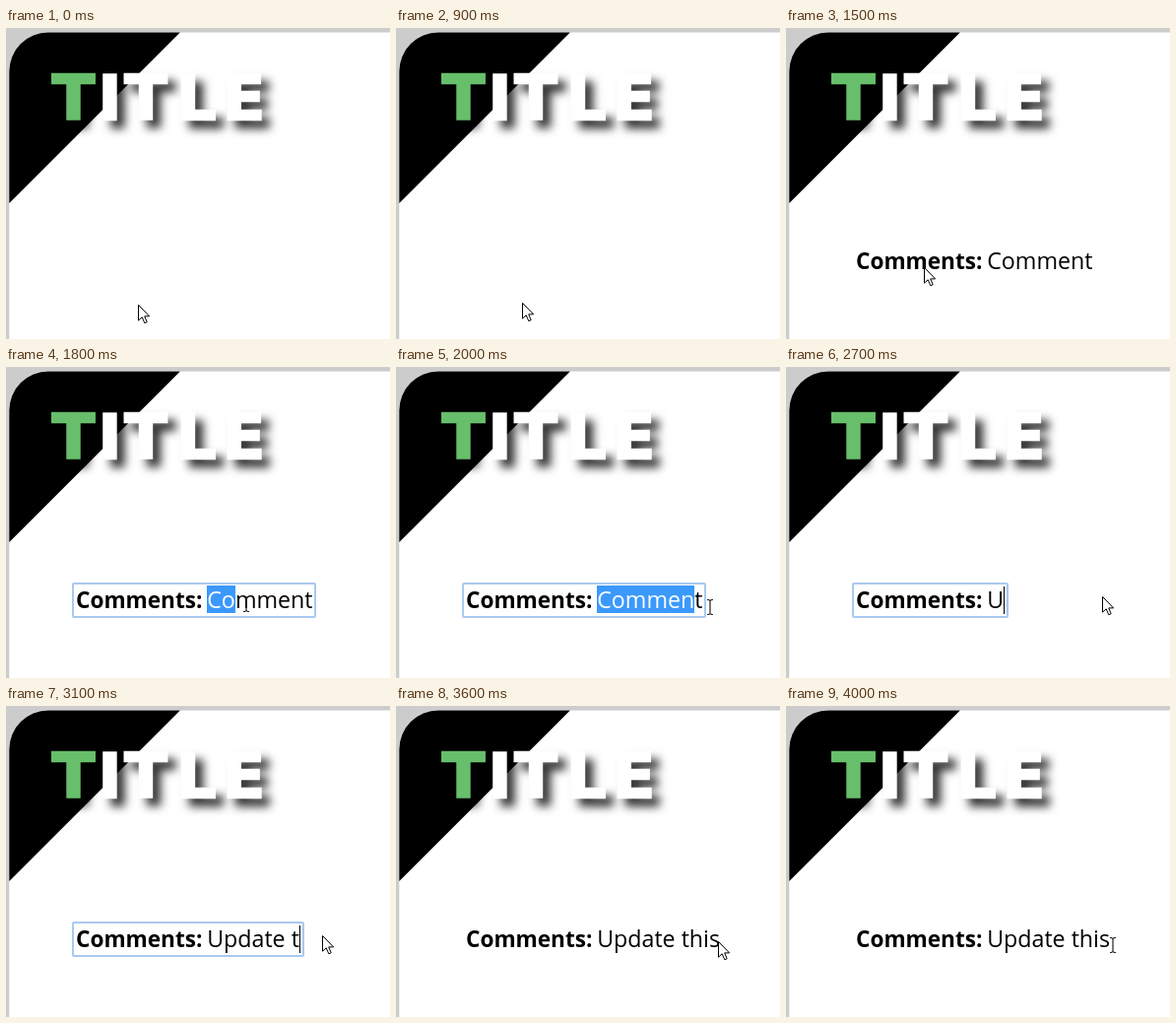
Animation of 390x316 px, one loop 4600 ms. Source, as an HTML page:

```html
<!DOCTYPE html>
<html lang="en">
<head>
<meta charset="utf-8">
<title>Inline edit</title>
<style>
  html, body { margin: 0; width: 100%; height: 100%; overflow: hidden; background: #ccc; }
  #stage { position: relative; width: 390px; height: 316px; overflow: hidden; }
  svg { position: absolute; left: 0; top: 0; }
  #title {
    font: bold 63px "DejaVu Sans", sans-serif;
    fill: #fff; stroke: #fff; stroke-width: 2.6px;
    filter: drop-shadow(8px 8px 5px rgba(0, 0, 0, .8));
  }
  #title tspan { fill: #67bf6b; stroke: #67bf6b; }
  #field {
    position: absolute; left: 67px; top: 219px; height: 32px;
    padding: 0 2px; border: 2px solid transparent; border-radius: 2px;
    font: 23.2px/31px "Open Sans", "Noto Sans", sans-serif;
    color: #000; white-space: pre;
  }
  #field.focus { border-color: #a9c9ef; }
  #field b { font-size: 22.6px; margin-right: 4.8px; }
  #field span { display: inline-block; line-height: 28px; }
  #picked { background: #3c99fc; color: #fff; }
  #caret { width: 1px; height: 28px; background: #000; vertical-align: top; margin-top: 2px; }
</style>
</head>
<body>
<div id="stage">
  <svg width="390" height="316">
    <path d="M3.3 316V44A39.5 39.5 0 0 1 42.8 4.5H390V316Z" fill="#fff"/>
    <path d="M3.3 178V44A39.5 39.5 0 0 1 42.8 4.5H176.8Z"/>
    <text id="title" y="93" x="47 93.8 120.5 173.3 220"><tspan>T</tspan>ITLE</text>
  </svg>
  <div id="field"><b>Comments:</b><span id="picked"></span><span id="rest"></span><span id="caret"></span></div>
  <svg width="390" height="316">
    <g id="pointer">
      <path id="arrow" d="M.5 .5V16.2L4.2 12.8L6.8 18.8L9.2 17.7L6.7 11.9H11.6Z" fill="#fff" stroke="#000"/>
      <path id="beam" d="M-2 -7.5H-.5L1 -6.5L2.5 -7.5H4M1 -6.5V6.5M-2 7.5H-.5L1 6.5L2.5 7.5H4" fill="none" stroke="#222" stroke-width="1.2"/>
    </g>
  </svg>
</div>
<script>
const LOOP = 4600, TICK = 100;
const $ = id => document.getElementById(id);

// time, x, y
const path = [
  [0, 134, 281], [800, 134, 281], [900, 128, 279], [1200, 130, 264],
  [1500, 140, 243], [1700, 205, 240], [2000, 318, 244], [2200, 323, 240],
  [2500, 321, 233], [3300, 321, 233], [3800, 331, 243]
];

// time, text, selected letters
const edits = [
  [0, "Comment", 0], [1800, "Comment", 2], [1900, "Comment", 4],
  [2000, "Comment", 6], [2100, "Comment", 7], [2600, "", 0],
  [2700, "U", 0], [2800, "Up", 0], [2900, "Upda", 0],
  [3000, "Update", 0], [3100, "Update t", 0], [3200, "Update this", 0]
];

const within = (t, from, to) => t >= from && t < to;
const clamp = v => Math.min(1, Math.max(0, v));
const latest = (rows, t) => rows.filter(r => r[0] <= t).pop();

function place(t) {
  const a = latest(path, t);
  const b = path[path.indexOf(a) + 1] || a;
  const k = a === b ? 0 : (t - a[0]) / (b[0] - a[0]);
  return [1, 2].map(i => Math.round(a[i] + (b[i] - a[i]) * k));
}

function show(el, on) {
  el.style.display = on ? "" : "none";
}

function draw(t) {
  const [, text, count] = latest(edits, t);
  const beam = within(t, 1700, 2300) || t >= 3700;
  $("picked").textContent = text.slice(0, count);
  $("rest").textContent = text.slice(count);
  $("field").style.opacity = clamp((t - 1100) / 200);
  $("field").classList.toggle("focus", within(t, 1700, 3600));
  show($("caret"), within(t, 2600, 3600));
  show($("beam"), beam);
  show($("arrow"), !beam);
  $("pointer").setAttribute("transform", `translate(${place(t)})`);
}

const start = performance.now();
function loop() {
  const t = (performance.now() - start) % LOOP;
  draw(Math.floor(t / TICK) * TICK);
  requestAnimationFrame(loop);
}
loop();
</script>
</body>
</html>
```
